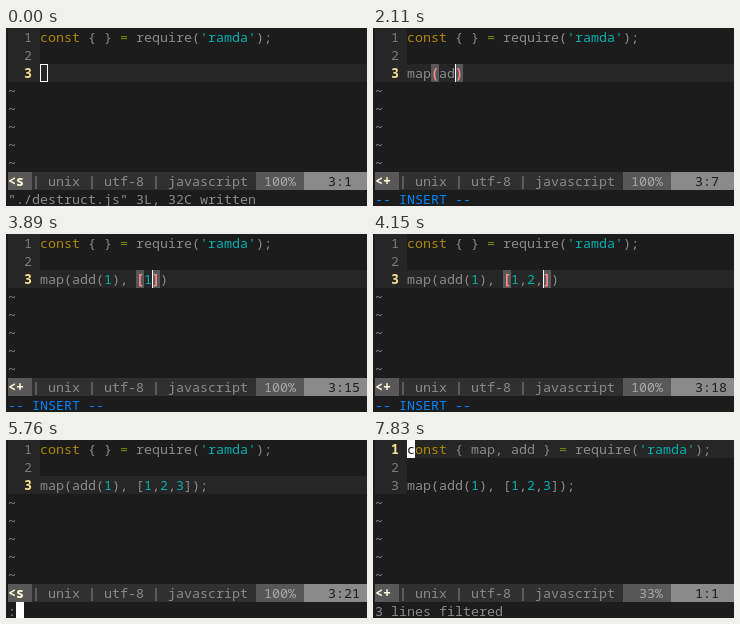
These frames come from a looping animation (361 by 178 pixels, 8 s). An HTML page:

```html
<!DOCTYPE html>
<html lang="en">
<head>
<meta charset="utf-8">
<title>Vim session</title>
<style>
  html, body { margin: 0; width: 100%; height: 100%; overflow: hidden; background: #1c1c1c; }
  svg { display: block; width: 361px; height: 178px; }
  text { white-space: pre; font-family: "Noto Sans Mono", "DejaVu Sans Mono", monospace; }
</style>
</head>
<body>
<svg id="stage" viewBox="0 0 361 178"></svg>
<script>
const LOOP = 8000, CELL = 8, ROW = 18, LEFT = 2, CODE = 4;
const STATUS = 8, CMD = 9;
const C = {
  bg: '#1c1c1c', gutter: '#262626', text: '#8a8a8a', number: '#7c7c7c', current: '#f5e08c',
  keyword: '#af8700', operator: '#6f8f00', literal: '#00afaf', blue: '#0087ff',
  match: '#ff8787', matchBg: '#585858', bar: '#303030', flag: '#ffffd7',
  mid: '#585858', midText: '#a8a8a8', pos: '#8a8a8a', cursor: '#ffffff'
};
const DONE = 'map(add(1), [1,2,3]);';
const SAVED_AT = 5310, FILTERED_AT = 7830;
const written = chars => `"./destruct.js" 3L, ${chars}C written`;

// time, mode, text before the cursor, text after it, command line
const steps = [
  [0, 'hollow', '', '', written(32)],
  [420, 'normal', '', '', written(32)],
  [680, 'insert', '', ''],
  [1130, 'insert', 'ma', ''],
  [1220, 'insert', 'map', ''],
  [1750, 'insert', 'map(', ')'],
  [1930, 'insert', 'map(a', ')'],
  [2110, 'insert', 'map(ad', ')'],
  [2650, 'insert', 'map(add', ')'],
  [3010, 'insert', 'map(add(1', '))'],
  [3190, 'insert', 'map(add(1)', ')'],
  [3450, 'insert', 'map(add(1),', ')'],
  [3540, 'insert', 'map(add(1), ', ')'],
  [3710, 'insert', 'map(add(1), [', '])'],
  [3890, 'insert', 'map(add(1), [1', '])'],
  [3980, 'insert', 'map(add(1), [1,', '])'],
  [4060, 'insert', 'map(add(1), [1,2', '])'],
  [4150, 'insert', 'map(add(1), [1,2,', '])'],
  [4690, 'insert', 'map(add(1), [1,2,3', '])'],
  [4780, 'normal', 'map(add(1), [1,2,', '3])', ''],
  [4960, 'insert', 'map(add(1), [1,2,3])', ''],
  [5040, 'insert', DONE, ''],
  [SAVED_AT, 'normal', DONE.slice(0, -1), ';', written(53)],
  [5760, 'command', DONE.slice(0, -1), ';', ':'],
  [6300, 'command', DONE.slice(0, -1), ';', ':%!ramda-destruct'],
  [7020, 'command', DONE.slice(0, -1), ';', ''],
  [FILTERED_AT, 'normal', DONE, '', '3 lines filtered']
];

const stage = document.getElementById('stage');

// Pick the size at which one character fills one cell.
const probe = document.createElement('canvas').getContext('2d');
probe.font = '100px "Noto Sans Mono", "DejaVu Sans Mono", monospace';
const fontSize = CELL * 100 / probe.measureText('0').width;

const x = col => LEFT + col * CELL;
const escape = s => s.replace(/&/g, '&amp;').replace(/</g, '&lt;');

function box(row, col, cols, fill) {
  return `<rect x="${x(col)}" y="${row * ROW}" width="${cols * CELL}" height="${ROW}" fill="${fill}"/>`;
}

function put(row, col, str, fill, bold) {
  if (!str.trim()) return '';
  return `<text x="${x(col)}" y="${row * ROW + 14}" font-size="${fontSize}" fill="${fill}"` +
    `${bold ? ' font-weight="700"' : ''}>${escape(str)}</text>`;
}

function code(row, str) {
  const tokens = /const|=|'[^']*'|\d|[^=\d']+?(?=const|=|'|\d|$)/g;
  const color = s => s === 'const' ? C.keyword : s === '=' ? C.operator :
    /^['\d]/.test(s) ? C.literal : C.text;
  return [...str.matchAll(tokens)].map(m => put(row, CODE + m.index, m[0], color(m[0]))).join('');
}

function findPair(str, at) {
  const isBracket = i => i >= 0 && '()[]'.includes(str[i] || ' ');
  const from = isBracket(at) ? at : at - 1;
  if (!isBracket(from)) return [];
  const dir = '(['.includes(str[from]) ? 1 : -1;
  for (let i = from, depth = 0; i >= 0 && i < str.length; i += dir) {
    if ('(['.includes(str[i])) depth++;
    if (')]'.includes(str[i])) depth--;
    if (depth === 0) return [from, i];
  }
  return [];
}

function blockCursor(row, col, char) {
  return box(row, col, 1, C.cursor) + put(row, col, char, C.bg);
}

function statusLine(modified, percent, pos) {
  return box(STATUS, 0, 45, C.bar) + box(STATUS, 0, 3, C.mid) +
    box(STATUS, 31, 6, C.mid) + box(STATUS, 37, 8, C.pos) +
    put(STATUS, 0, modified ? '<+' : '<s', C.flag, true) +
    put(STATUS, 3, '| unix | utf-8 | javascript', C.text) +
    put(STATUS, 36 - percent.length, percent, C.midText) +
    put(STATUS, 40, pos, C.bg);
}

function draw([time, mode, before, after, msg]) {
  const filtered = time >= FILTERED_AT;
  const line = before + after;
  const first = `const { ${filtered ? 'map, add ' : ''}} = require('ramda');`;
  const row = filtered ? 0 : 2;
  const col = filtered ? 0 : before.length;
  const modified = filtered || line !== (time < SAVED_AT ? '' : DONE);

  let out = `<rect width="361" height="178" fill="${C.bg}"/>` + box(row, 0, 45, C.gutter);
  for (let r = 0; r < 3; r++) {
    out += box(r, 0, CODE, C.gutter) +
      put(r, 2, String(r + 1), r === row ? C.current : C.number, r === row);
  }
  for (let r = 3; r < STATUS; r++) out += put(r, 0, '~', C.text);
  out += code(0, first) + code(2, line);

  if (mode === 'insert') {
    for (const i of findPair(line, col)) {
      out += box(2, CODE + i, 1, C.matchBg) + put(2, CODE + i, line[i], C.match, true);
    }
    out += `<rect x="${x(CODE + col)}" y="36" width="1" height="${ROW}" fill="${C.cursor}"/>`;
    out += put(CMD, 0, '-- INSERT --', C.blue);
  } else {
    out += put(CMD, 0, msg, C.text);
  }
  if (mode === 'normal') out += blockCursor(row, CODE + col, (filtered ? first : line)[col] || ' ');
  if (mode === 'command') out += blockCursor(CMD, msg.length, ' ');
  if (mode === 'hollow') {
    out += `<rect x="34.5" y="36.5" width="7" height="17" fill="none" stroke="${C.cursor}"/>`;
  }

  stage.innerHTML = out + statusLine(modified, filtered ? '33%' : '100%', `${row + 1}:${col + 1}`);
}

let shown = null;
const start = performance.now();

function tick() {
  const t = (performance.now() - start) % LOOP;
  const step = steps.findLast(s => s[0] <= t) || steps[0];
  if (step !== shown) draw(shown = step);
  requestAnimationFrame(tick);
}
tick();
</script>
</body>
</html>
```
